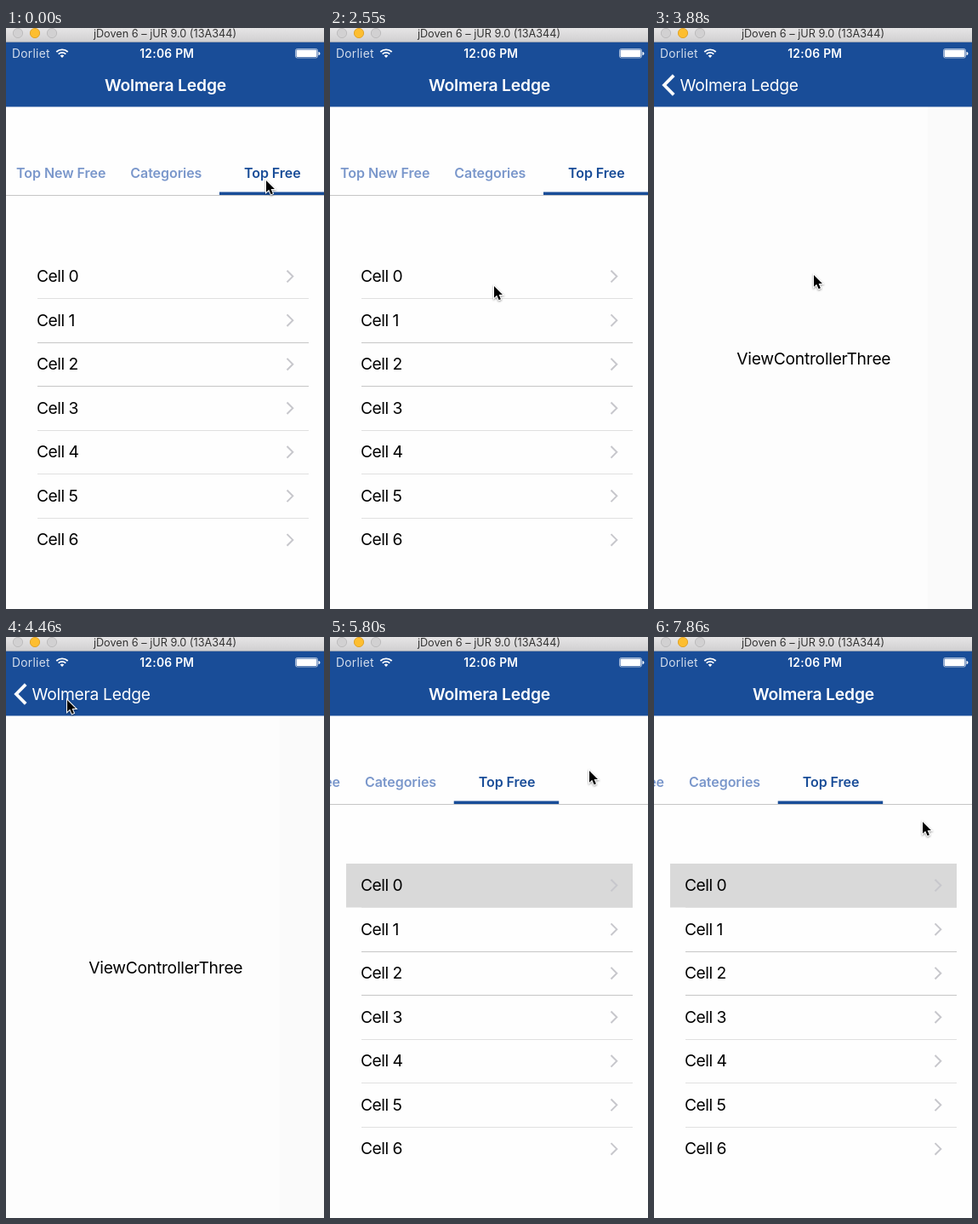
Animation of 374x682 px, one loop 8 s. Source, as an HTML page:

```html
<!DOCTYPE html>
<html lang="en">
<head>
<meta charset="utf-8">
<title>Navigation demo</title>
<style>
  html, body { margin: 0; width: 374px; height: 682px; overflow: hidden; background: #fefefe; }
  svg { display: block; }
  text { font: 400 19.3px Inter, "Open Sans", sans-serif; letter-spacing: -.015em; }
  .mid { text-anchor: middle; }
  .cell { letter-spacing: -.026em; }
  .tab { font-size: 16px; font-weight: 600; letter-spacing: -.003em; fill: #7a97cb; }
  .on { fill: #194d98; }
  .bold { font-weight: 600; letter-spacing: -.01em; }
  .status { font-size: 13.8px; letter-spacing: .02em; }
  .window { font-size: 12.7px; letter-spacing: 0; fill: #333; }
  #cursor { filter: drop-shadow(0 1px 1px #0006); }
</style>
</head>
<body>
<svg width="374" height="682" viewBox="0 0 374 682">
  <defs>
    <linearGradient id="bar" x2="0" y2="1">
      <stop stop-color="#e6e5e6"/><stop offset="1" stop-color="#d1d0d1"/>
    </linearGradient>
  </defs>

  <g id="list">
    <rect x="-120" y="92" width="620" height="590" fill="#fefefe"/>
    <rect y="196" width="374" height="1" fill="#c6c6c6"/>
    <g id="tabs">
      <text class="tab mid" x="64.7" y="176">Top New Free</text>
      <text class="tab mid" x="188.3" y="176">Categories</text>
      <text class="tab mid on" x="313.3" y="176">Top Free</text>
      <rect class="on" x="251" y="192.5" width="123.5" height="3.5"/>
    </g>
    <rect id="selected" x="19" y="266" width="337" height="51.5" fill="#d9d9d9"/>
    <g id="rows"></g>
  </g>
  <rect id="dim" y="92" width="374" height="590"/>

  <g id="detail">
    <rect y="92" width="374" height="590" fill="#fdfdfd"/>
    <text class="mid" x="187.8" y="395">ViewControllerThree</text>
  </g>
  <rect id="strip" x="322" y="92" width="52" height="590" fill="#fafafa"/>

  <rect y="16" width="374" height="76.5" fill="#194d98"/>
  <g fill="#fff">
    <text id="title" class="bold mid" x="187.5" y="74">Wolmera Ledge</text>
    <text id="back" x="30.5" y="74">Wolmera Ledge</text>
    <path id="arrow" d="M23.2 55.7L12 67l11.2 11.3" fill="none" stroke="#fff" stroke-width="3.8"/>
    <text class="status" x="7" y="35" fill="#d3ddec">Dorliet</text>
    <text class="status mid" x="189.3" y="35" font-weight="600" style="font-weight:600">12:06 PM</text>
    <path d="M59.3 28a9.6 9.6 0 0 1 13.4 0M61.7 30.6a6.2 6.2 0 0 1 8.6 0" fill="none" stroke="#fff" stroke-width="1.8"/>
    <path d="M63.7 32.5a3.3 3.3 0 0 1 4.6 0L66 34.9z"/>
    <rect x="340.5" y="24.5" width="26" height="10.5" rx="2" fill="none" stroke="#fff" stroke-opacity=".6"/>
    <rect x="341.5" y="25.5" width="24" height="8.5" rx="1"/>
    <path d="M367.5 28a2 2 0 0 1 0 4z"/>
  </g>

  <rect width="374" height="16" fill="url(#bar)"/>
  <rect y="16" width="374" height="1" fill="#8e9bb0"/>
  <g stroke-width="1">
    <circle cx="14" cy="6" r="5.6" fill="#d2d1d2" stroke="#bdbcbd"/>
    <circle cx="34" cy="6" r="5.6" fill="#fdbe30" stroke="#e0a32a"/>
    <circle cx="54" cy="6" r="5.6" fill="#d2d1d2" stroke="#bdbcbd"/>
  </g>
  <text class="window mid" x="187" y="11">jDoven 6 – jUR 9.0 (13A344)</text>

  <path id="cursor" d="M0 0V13.8l3.2-3 2.4 5.4 2.3-1-2.3-5.2H10z" stroke="#fff" stroke-width="2" paint-order="stroke"/>
</svg>
<script>
const LOOP = 8000, START = 1492, STEP = 148;
const PUSH = 8.32, POP = 20.1, SCROLL = 23;
const el = id => document.getElementById(id);
const clamp = v => Math.min(1, Math.max(0, v));
const move = (id, x, y = 0) => el(id).setAttribute('transform', `translate(${x} ${y})`);
const fade = (id, v) => el(id).setAttribute('opacity', clamp(v));

// Cursor tip: step, x, y
const path = [
  [-1, 306, 179], [0, 304, 182], [1, 296, 192], [3, 250, 240], [5, 200, 292], [6, 193, 300.5], [7, 193, 303],
  [15, 193, 303], [16, 188, 290], [18, 120, 150], [19, 84, 88], [20, 72, 74], [22, 74, 73], [23, 76, 74],
  [24, 84, 77], [26, 200, 120], [28, 295, 155], [29, 305, 157], [31, 300, 160], [33, 245, 130], [34, 238, 110],
  [36, 338, 130], [37, 330, 165], [38, 300, 192], [39, 283, 150], [40, 281, 145], [41, 292, 165], [43, 316, 217]
];

let rows = '';
for (let i = 0; i < 7; i++) {
  const y = 51.55 * i;
  rows += `<text class="cell" x="36" y="${298 + y}">Cell ${i}</text>
    <path d="M330.5 ${284.8 + y}l6.8 6.8-6.8 6.8" fill="none" stroke="#c7c7cc" stroke-width="2"/>`;
  if (i < 6) rows += `<rect x="37" y="${Math.floor(317.55 + y)}" width="319" height="1"
    fill="${i == 1 || i == 2 ? '#c6c6c6' : '#e0e0e0'}"/>`;
}
el('rows').innerHTML = rows;

// Share of a critically damped move that is still to go
function left(w) {
  w = Math.max(0, w);
  const r = (1 + w) * Math.exp(-w);
  return r < .004 ? 0 : r;
}

function cursorAt(k) {
  const i = Math.max(1, path.findIndex(p => p[0] >= k));
  const [k0, x0, y0] = path[i - 1], [k1, x1, y1] = path[i];
  const u = (k - k0) / (k1 - k0);
  return [x0 + (x1 - x0) * u, y0 + (y1 - y0) * u];
}

function draw(now) {
  const k = Math.max(-1, Math.min(43, Math.floor((now % LOOP - START) / STEP)));
  const popping = k > POP;
  const cover = popping ? left(2.2 * (k - POP)) : 1 - left(2.2 * (k - PUSH));

  move('list', -112 * cover);
  move('tabs', k < PUSH ? 0 : -2.3 - 103 * (1 - left(1.6 * (k - SCROLL))));
  fade('selected', k > PUSH ? 1 : 0);
  fade('dim', .1 * cover);
  move('detail', 374 * (1 - cover));
  fade('strip', k > PUSH && !popping ? 1 : 0);

  move('title', -82 * cover);
  fade('title', 1 - (popping ? 10 : 2) * cover);
  move('back', 82 * (1 - cover));
  fade('back', (popping ? 2 : 1) * cover);
  fade('arrow', cover ** 10);
  move('cursor', ...cursorAt(k));
  requestAnimationFrame(draw);
}
requestAnimationFrame(draw);
</script>
</body>
</html>
```
